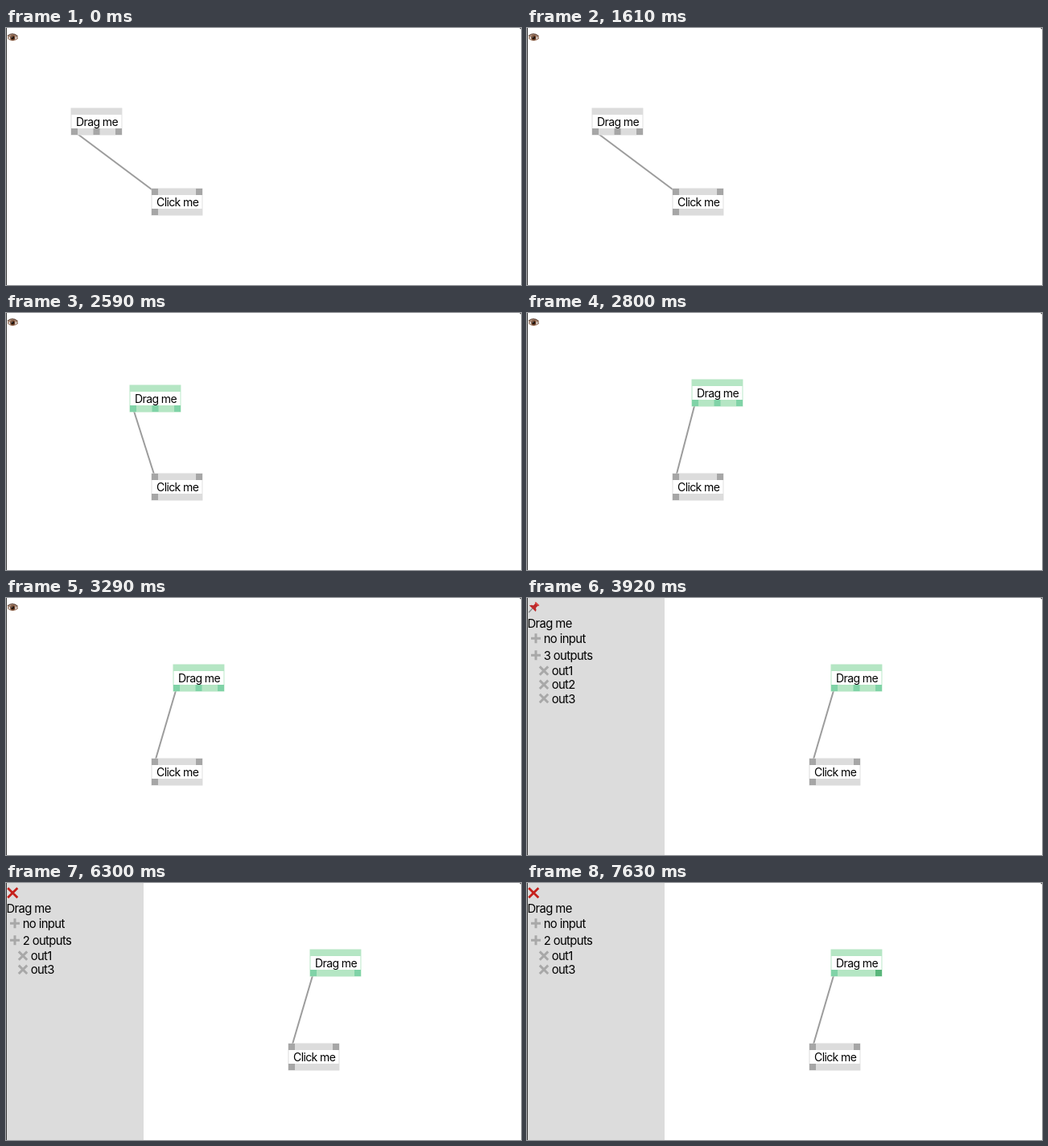
Write an HTML page that moves like this. It is 640x320 px and loops after 8000 ms.

```html
<!DOCTYPE html>
<html lang="en">
<head>
<meta charset="utf-8">
<title>Node editor</title>
<style>
  html, body { margin: 0; width: 100%; height: 100%; overflow: hidden; background: #fff; }
  svg { display: block; width: 100%; height: 100%; }
  text { font-family: Inter, "Liberation Sans", sans-serif; fill: #000; letter-spacing: -0.6px; white-space: pre; }
  .node text { font-size: 14px; }
  #panel text { font-size: 14.8px; }
  .bar { fill: #dcdcdc; }
  .port { fill: #a6a6a6; }
  .selected .bar { fill: #b5e6c4; }
  .selected .port { fill: #80d3a7; }
  .selected .port.hover { fill: #5ab67b; }
  .mark { stroke: #a8a8a8; stroke-width: 3; fill: none; }
</style>
</head>
<body>
<svg viewBox="0 0 640 320" preserveAspectRatio="none">
  <rect width="640" height="320" fill="#fff"/>
  <g id="canvas">
    <line id="link" stroke="#9c9c9c" stroke-width="2"/>
    <g id="drag" class="node"></g>
    <g id="click" class="node" transform="translate(181 200)"></g>
  </g>
  <g id="panel">
    <rect width="171" height="320" fill="#dcdcdc"/>
    <text x="0.5" y="37.2">Drag me</text>
    <path class="mark" d="M5 50.3h12M11 44.3v12M5 71.3h12M11 65.3v12"/>
    <text x="20.7" y="56.2">no input</text>
    <text id="count" x="20.7" y="77.2"></text>
    <g id="outs"></g>
  </g>
  <g id="eye">
    <path d="M2 10.5Q8 4.5 14.5 10.5L15 13.5Q8 18.5 2 13.5Z" fill="#c9a48c"/>
    <path d="M2 10Q8 4.8 14.6 10.4" fill="none" stroke="#5b4034" stroke-width="1.2"/>
    <path d="M2.2 12.5Q8 6.5 14.6 12.5Q8 17.8 2.2 12.5Z" fill="#f3efec" stroke="#6d5549" stroke-width=".7"/>
    <circle cx="8.3" cy="12.2" r="3.1" fill="#6b3f26"/>
    <circle cx="8.3" cy="12.2" r="1.6" fill="#150d0a"/>
    <circle cx="7.4" cy="11" r=".6" fill="#fff"/>
  </g>
  <g id="pin">
    <path d="M6.8 13L2.2 18" stroke="#87898c" stroke-width="1.2"/>
    <path d="M2.8 9.3Q5.8 8.2 8 9.2L10.3 6.8L10 5L15 9.9L13.2 10L11 12.2Q12 14.6 10.8 17Z" fill="#bd2a2b"/>
    <path d="M10.3 5.3L14.8 9.7" stroke="#dc4a45" stroke-width="1.8"/>
  </g>
  <path id="close" d="M2.2 6.2L14.3 18.2M14.3 6.2L2.2 18.2" stroke="#c5211c" stroke-width="2.8"/>
  <rect width="1" height="320" fill="#3a3a3a"/>
  <path d="M637.5 0H640V2.5Q640 0 637.5 0Z" fill="#222"/>
</svg>
<script>
  const LOOP = 8000, TICK = 70;
  const SELECT = 2310, DRAG = 2450, OPEN = 3920, PINNED = 4480, REMOVE = 6230, HOVER = 7630;
  const PANEL_WIDTH = 170;
  // Pointer offset at each tick of the drag
  const path = [18, 45, 73, 97, 114, 124, 129, 131, 129, 127];
  const $ = id => document.getElementById(id);

  const port = (x, y) => `<rect class="port" x="${x}" y="${y}" width="8" height="8"/>`;

  function buildNode(id, label, inputs, outputs) {
    $(id).innerHTML =
      '<rect class="bar" x="-.5" y="-.5" width="63.9" height="34"/>' +
      '<rect x=".5" y="8" width="62" height="17" fill="#fff"/>' +
      inputs.map(x => port(x, 0)).join('') +
      outputs.map(x => port(x, 25)).join('') +
      `<text x="6" y="21.8">${label}</text>`;
  }

  buildNode('drag', 'Drag me', [], [0, 27.5, 55]);
  buildNode('click', 'Click me', [0, 55], [0]);
  const ports = $('drag').querySelectorAll('.port');

  function show(id, on) {
    $(id).style.display = on ? '' : 'none';
  }

  function listOutputs(names) {
    $('count').textContent = names.length + ' outputs';
    $('outs').innerHTML = names.map((name, i) =>
      `<g transform="translate(0 ${17.2 * i})">` +
      '<path class="mark" d="M15.8 85.4l10.4 10.4M26.2 85.4l-10.4 10.4"/>' +
      `<text x="30.7" y="96.2">${name}</text></g>`).join('');
  }

  function dragOffset(t) {
    if (t < DRAG) return 0;
    const step = Math.floor((t - DRAG) / TICK);
    return path[Math.min(step, path.length - 1)];
  }

  let removed = null;

  function draw(t) {
    const dx = dragOffset(t);
    const x = 81 + dx;
    const y = 100 - Math.min(17, Math.round(dx * 17 / 127));
    const open = t >= OPEN;

    $('drag').setAttribute('transform', `translate(${x} ${y})`);
    $('drag').classList.toggle('selected', t >= SELECT);
    const ends = { x1: x + 4, y1: y + 29, x2: 185, y2: 204 };
    for (const key in ends) $('link').setAttribute(key, ends[key]);
    $('canvas').setAttribute('transform', `translate(${open ? PANEL_WIDTH : 0} 0)`);

    show('panel', open);
    show('eye', !open);
    show('pin', open && t < PINNED);
    show('close', t >= PINNED);

    const gone = t >= REMOVE;
    if (gone !== removed) {
      removed = gone;
      listOutputs(gone ? ['out1', 'out3'] : ['out1', 'out2', 'out3']);
      ports[1].style.display = gone ? 'none' : '';
    }
    ports[2].classList.toggle('hover', t >= HOVER);
  }

  const start = performance.now();
  function frame() {
    draw((performance.now() - start) % LOOP);
    requestAnimationFrame(frame);
  }
  draw(0);
  requestAnimationFrame(frame);
</script>
</body>
</html>
```
